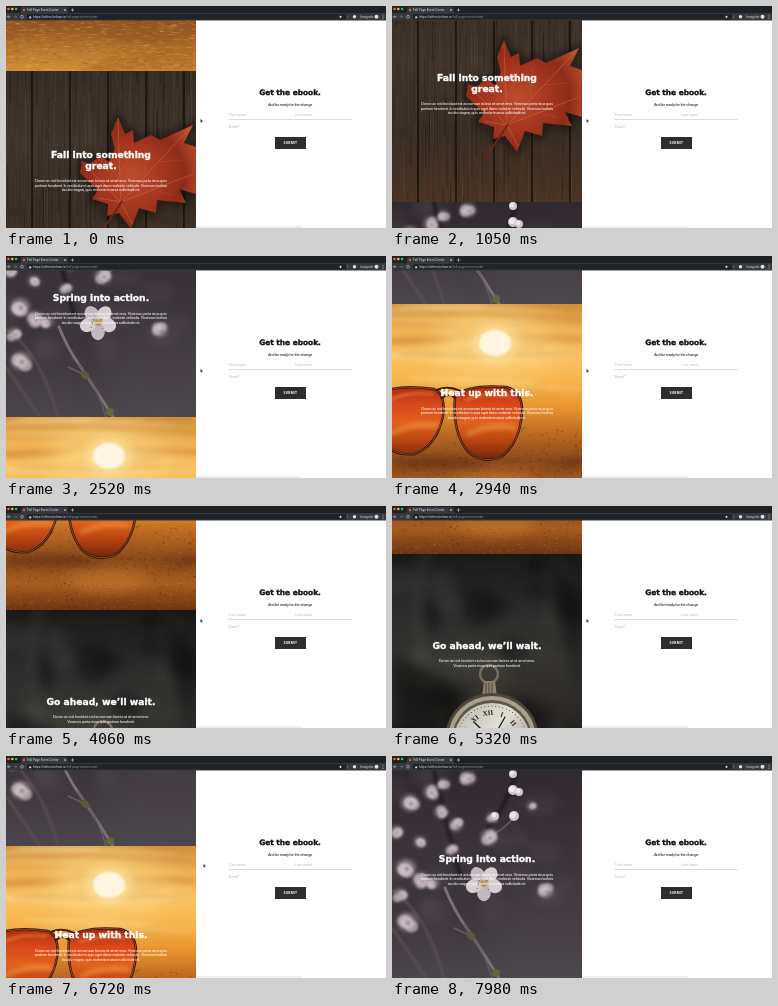
An HTML page with a canvas for the animation above (8120 ms loop, 380 by 222 pixels).

```html
<!DOCTYPE html>
<html lang="en">
<head>
<meta charset="utf-8">
<title>Seasons landing page</title>
<style>
html, body { margin: 0; width: 100%; height: 100%; overflow: hidden; background: #fff; }
#stage { position: relative; width: 380px; height: 222px; overflow: hidden; font: 4px/4.6px Roboto, sans-serif; }
#stage div, #stage span, canvas, h2, p, svg { position: absolute; margin: 0; white-space: pre; }
#view { left: 0; top: 14px; width: 190px; height: 208px; overflow: hidden; }
.panel { left: 0; width: 190px; height: 208px; color: #fff; text-align: center; }
.panel h2, .panel p { left: 0; width: 190px; }
h2 { font: 700 9.2px/10.6px "DejaVu Sans", sans-serif; -webkit-text-stroke: .35px; }
p { letter-spacing: -.21px; }
#form { left: 190px; top: 14px; width: 190px; height: 208px; background: #fff; color: #111; }
#form h2, #form p { left: 0; width: 188px; text-align: center; }
#form h2 { top: 68px; font-size: 7.4px; }
#form p { top: 82.8px; }
#form span { color: #b8b8b8; font-size: 3.6px; }
#form i { position: absolute; height: 1px; background: #ddd; }
#button { left: 79px; top: 117px; width: 31px; height: 12px; background: #2d2d2d; color: #fff;
  font: 700 3.3px/12px Roboto, sans-serif; letter-spacing: .3px; text-align: center; }
</style>
</head>
<body>
<div id="stage">
  <div id="view"><div id="page"></div></div>
  <div id="form">
    <h2>Get the ebook.</h2>
    <p>And be ready for the change</p>
    <span style="left:33px;top:93px">First name</span>
    <span style="left:99px;top:93px">Last name</span>
    <span style="left:33px;top:104.5px">Email*</span>
    <i style="left:32px;top:99px;width:124px"></i>
    <div id="button">SUBMIT</div>
    <i style="left:0;top:206px;width:106px;height:2px;background:#eee"></i>
  </div>
  <svg width="380" height="15" style="left:0;top:0" font-family="Roboto, sans-serif" font-size="3.2">
    <path fill="#1e2124" d="M0 0H380V14H0Z"/>
    <path fill="#35393d" d="M0 7H14Q15 7 15 5V3Q15 1 17 1H60Q62 1 62 3V5Q62 7 63 7H380V14.6H0Z"/>
    <circle cx="2.5" cy="3" r="1.3" fill="#f35f56"/>
    <circle cx="6.3" cy="3" r="1.3" fill="#f7bd2e"/>
    <circle cx="10.1" cy="3" r="1.3" fill="#2bc840"/>
    <circle cx="18" cy="4" r="1.2" fill="#e8622c"/>
    <path fill="#202327" d="M22 8H340V13.4H22Q19.5 10.7 22 8Z"/>
    <g fill="#dcdee0">
      <text x="21" y="5.2">Fall Page Event Center</text>
      <text x="27" y="12">https://offers.kelmor.io<tspan fill="#8c9094">/fall-page-event-center</tspan></text>
      <text x="354" y="12">Incognito</text>
      <circle cx="348.5" cy="10.7" r="1.7"/>
      <circle cx="370.5" cy="10.7" r="2"/>
      <path d="M333 10.3H336L333.6 12.2L334.5 9L335.4 12.2ZM376.6 8.8h.8v.8h-.8zM376.6 10.4h.8v.8h-.8zM376.6 12h.8v.8h-.8zM23.2 10.4h2v1.8h-2z"/>
    </g>
    <g fill="none" stroke="#c8cbce" stroke-width=".6">
      <path d="M58 3l2 2m0-2l-2 2M66.5 2.3v3.4M64.8 4h3.4M4.6 10.7H1.5l1.4-1.4M1.5 10.7l1.4 1.4"/>
      <path stroke="#777" d="M7.7 10.7h3.1l-1.4-1.4M10.8 10.7l-1.4 1.4M341.5 9.5v2.5"/>
      <circle cx="16" cy="10.7" r="1.4"/>
    </g>
  </svg>
  <svg id="cursor" width="4" height="5" style="left:0;top:0"><path d="M.4 .3V4L1.4 3.2L2 4.6L2.6 4.3L2 3H3.2Z" fill="#111" stroke="#fff" stroke-width=".3"/></svg>
</div>
<script>
const W = 190, H = 208, TAU = Math.PI * 2;
let seed = 7;
const rnd = (a = 0, b = 1) => {
  seed = (seed * 16807) % 2147483647;
  return a + (b - a) * seed / 2147483647;
};

let c;
function shade(gradient, stops) {
  stops.forEach((color, i) => gradient.addColorStop(i / (stops.length - 1), color));
  return gradient;
}
function backdrop(...stops) {
  c.fillStyle = shade(c.createLinearGradient(0, 0, 0, H), stops);
  c.fillRect(0, 0, W, H);
}
function oval(x, y, rx, ry, fill, blur = 0, turn = 0) {
  c.filter = blur ? `blur(${blur}px)` : 'none';
  c.fillStyle = fill;
  c.beginPath();
  c.ellipse(x, y, rx, ry, turn, 0, TAU);
  c.fill();
  c.filter = 'none';
}
function path(d, color, width, blur = 0) {
  c.filter = blur ? `blur(${blur}px)` : 'none';
  const p = new Path2D(d);
  c.lineCap = c.lineJoin = 'round';
  if (width) { c.strokeStyle = color; c.lineWidth = width; c.stroke(p); }
  else { c.fillStyle = color; c.fill(p); }
  c.filter = 'none';
}
function grain(n, y0, y1, w, h, colors) {
  for (let i = 0; i < n; i++) {
    c.fillStyle = colors[i % colors.length];
    c.fillRect(rnd(-w, W), rnd(y0, y1), w * rnd(.4, 1), h * rnd(.4, 1));
  }
}

function desert() {
  backdrop('#d9a860', '#c88a42', '#b8722d', '#925322', '#d18e36');
  path('M0 157H190V180Q140 186 90 174T0 178Z', '#8f542677', 0, 2);
  path('M190 174Q120 186 70 208H190Z', '#a8662599', 0, 3);
  grain(650, 155, H, 7, 1, ['#e9b35a55', '#7b431c44', '#f0c87a33']);
}

function leaf() {
  backdrop('#352c25', '#40352c', '#382d25', '#4a3424');
  grain(380, -40, H, 1, 70, ['#7465543a', '#15100c55', '#59483944']);
  for (let x = 26; x < W; x += 38) path(`M${x} 0V208`, '#120e0b', 1.4, .5);
  const edge = 'M112 46L119 63L127 59L128 72L145 64L154 69L187 54L178 72L190 76V123L173 118L180 132L151 129L150 142L133 137L125 158L113 142L101 145L102 133L86 128L92 119L74 102L76 90L84 93L94 85L103 91L109 78L105 63Z';
  path(edge, '#0a0604aa', 6, 4);
  path(edge, shade(c.createRadialGradient(126, 105, 5, 126, 105, 75), ['#b94a2c', '#a83720', '#8f2b19', '#c2512e']));
  path('M115 131L112 52M115 131L183 58M115 131L79 94M115 131L187 103M115 131L126 152M115 131L92 127', '#d4753f99', .8);
  path('M113 92L106 83M114 103L122 89M139 104L140 76M153 91L175 89M145 118L165 124', '#d4753f77', .5);
  path('M116 130Q107 145 92 165', '#6e2418', 1.8);
}

function flower(x, y, r) {
  for (let i = 0; i < 5; i++) {
    const a = i * TAU / 5 + .32;
    oval(x + Math.cos(a) * r * .58, y + Math.sin(a) * r * .55, r * .46, r * .38, i % 2 ? '#c4b8c0' : '#d8cdd3', .7, a);
  }
  oval(x, y, r * .25, r * .22, '#b59a62', .8);
  for (let i = 0; i < 9; i++) oval(x + rnd(-r, r) * .4, y + rnd(-r, r) * .4, .6, .6, '#7d6243');
}
function spring() {
  backdrop('#2f292f', '#3a3339', '#3d363d', '#4b464b');
  oval(160, 170, 60, 70, '#514c5255', 15);
  for (let i = 0; i < 16; i++) oval(rnd(0, W), rnd(0, 150), rnd(8, 20), rnd(6, 16), '#766a7022', 5);
  path('M42 0Q56 60 68 105M125 0Q118 30 96 58', '#231c1f', 4, 1.5);
  path('M0 120Q34 142 52 208M0 158L34 208', '#5b4e50', 2.5, 1);
  path('M53 118Q62 140 72 154T107 208', '#7a7078', 3, .5);
  path('M72 154Q92 178 100 208M79 166L62 158M97 66Q112 60 122 47', '#665b62', 1.5, .5);
  [[76, 8, 9], [49, 42, 8], [39, 22, 9], [18, 33, 11], [100, 48, 6], [97, 67, 10], [64, 55, 8],
   [14, 98, 12], [29, 110, 10], [41, 113, 7], [15, 152, 12], [154, 121, 9], [4, 62, 8], [52, 14, 7],
   [60, 80, 7], [28, 72, 7], [8, 125, 8], [140, 36, 5]]
    .forEach(([x, y, r]) => {
      oval(x, y, r * .8, r * .75, '#b3a3abaa', 2);
      for (let i = 0; i < 3; i++) oval(x + rnd(-.4, .4) * r, y + rnd(-.4, .4) * r, r * .55, r * .5, '#d0c4c999', 1.3);
      oval(x + 1, y + 1, r * .2, r * .18, '#76616788', 1);
    });
  [[122, 46, 5], [121, 20, 5], [127, 22, 4], [121, 4, 4], [103, 46, 4]].forEach(([x, y, r]) => {
    oval(x, y, r, r, '#cfc5c9', .7);
    oval(x - 1, y - 1, r * .6, r * .6, '#eee8ea', .7);
  });
  flower(92, 113, 18);
  oval(79, 166, 5, 3.5, '#5b5a3d', .6, .8);
  oval(104, 203, 4, 4, '#66633f', .6);
}

function glasses() {
  backdrop('#cf9140', '#f0b252', '#f9c261', '#f6b44a', '#e8942f', '#bb6a22', '#8a4a1c', '#a65c1f', '#6d3412');
  for (let i = 0; i < 22; i++) oval(rnd(0, W), rnd(0, 90), rnd(40, 90), rnd(1.5, 4), i % 2 ? '#c9803055' : '#ffe09a55', 2, rnd(-.06, .06));
  oval(103, 40, 60, 32, '#ffdf8f88', 14);
  oval(103, 39, 24, 19, '#ffe9ab99', 5);
  oval(103, 39, 16, 13, '#fff5e0', 1.2);
  grain(900, 122, H, 2.5, 1.4, ['#e0944433', '#2f160a44', '#b8692a55']);
  path('M0 158Q50 148 95 160T190 152V164H0Z', '#4a1f0b77', 0, 4);
  oval(102, 178, 40, 12, '#d3873a66', 6);
  const lens = shade(c.createLinearGradient(0, 82, 0, 156), ['#a8290d', '#d8481a', '#e2611c', '#b8430f', '#6e250b']);
  const rims = ['M-8 88Q8 80 42 85Q54 90 51 112Q45 141 23 150Q3 152 -8 140Z',
                'M63 92Q76 80 114 83Q131 87 130 108Q128 139 109 153Q92 160 77 149Q60 130 63 92Z'];
  rims.forEach(d => {
    path(d, lens);
    path(d, '#35110a', 2.4);
    path(d, '#d68a42', .5);
  });
  path('M50 94Q57 88 63 94M45 86Q56 81 68 87', '#431409', 2);
  path('M74 96Q92 88 118 92M0 95Q18 87 40 90', '#f6a04b77', 3, 1.5);
  path('M76 130Q97 120 122 124M0 129Q22 119 45 122', '#fabd5966', 5, 2);
}

function watch() {
  backdrop('#19191a', '#2b2b2b', '#373632', '#2c2a26', '#171614');
  for (let i = 0; i < 28; i++) oval(rnd(0, W), rnd(10, H), rnd(8, 28), rnd(6, 22), i % 2 ? '#0b0b0c66' : '#65625a2c', 6);
  path('M0 95L60 130L42 208H0ZM150 0L190 40V150Z', '#0d0d0e99', 0, 8);
  path('M34 0Q20 50 32 108', '#5a595544', 10, 6);
  path('M88 120a9 9 0 1 1 18 0a9 9 0 1 1 -18 0', '#78705f', 2.4);
  path('M92 127H103L105 143H90Z', '#8b816c');
  path('M94 129V141M97 129V141M100 129V141', '#3f392e', .8);
  oval(100, 185, 47, 46, '#4d463b');
  oval(100, 185, 44, 43, '#aaa18d');
  oval(100, 185, 40, 39, '#5d564b');
  oval(100, 186, 38, 37, shade(c.createLinearGradient(65, 150, 135, 208), ['#b9b6ad', '#e2dfd5', '#9b978b']));
  c.fillStyle = '#25231f';
  c.font = '700 7px "Liberation Serif", serif';
  c.textAlign = 'center';
  ['XII', 'I', 'II', 'III', 'IV', 'V', 'VI', 'VII', 'VIII', 'IX', 'X', 'XI'].forEach((s, i) => {
    c.save();
    c.translate(100, 186);
    c.rotate(i * TAU / 12 - .15);
    c.fillText(s, 0, -25);
    c.restore();
  });
  for (let i = 0; i < 60; i++) {
    const a = i * TAU / 60;
    oval(100 + Math.cos(a) * 35, 186 + Math.sin(a) * 34, .5, .5, '#333');
  }
  path('M100 186L82 168M100 186L113 163', '#1b1a18', 1.3);
  oval(100, 186, 2, 2, '#1b1a18');
}

const lorem = `Donec ac nisl tincidunt est accumsan lacinia sit amet eros. Vivamus porta risus quis
pretium hendrerit. In vestibulum turpis eget diam molestie vehicula. Vivamus facilisis
iaculis magna, quis molestie massa sollicitudin et.`;
const shortLorem = `Donec ac nisl tincidunt nisl accumsan lacinia at sit amet eros.
Vivamus porta risus quis pretium hendrerit.`;
// painter, heading, heading top, paragraph, paragraph top
const panels = [
  [desert, '', 0, '', 0],
  [leaf, 'Fall into something\ngreat.', 79, lorem, 108],
  [spring, 'Spring into action.', 84, lorem, 102.5],
  [glasses, 'Heat up with this.', 84, lorem, 102.5],
  [watch, 'Go ahead, we’ll wait.', 86.5, shortLorem, 105]
];
const page = document.getElementById('page');
function add(parent, tag, props, top) {
  const el = Object.assign(document.createElement(tag), props);
  el.style.top = top + 'px';
  return parent.appendChild(el);
}
panels.forEach(([paint, title, titleTop, text, textTop], i) => {
  const panel = add(page, 'div', { className: 'panel' }, i * H);
  c = add(panel, 'canvas', { width: W, height: H, style: 'left:0' }, 0).getContext('2d');
  paint();
  add(panel, 'h2', { textContent: title }, titleTop);
  add(panel, 'p', { textContent: text }, textTop);
});

// first moving tick, time already elapsed by then, from panel, to panel
const moves = [
  [0, 485, 0, 1], [1050, 61, 1, 2], [2450, 82, 2, 3],
  [3780, 48, 3, 4], [5320, 82, 4, 3], [6580, 55, 3, 2]
];
const LOOP = 8120, TICK = 70, GLIDE = 960;
const clamp = x => Math.min(1, Math.max(0, x));
const cursor = document.getElementById('cursor');

function draw(now) {
  const t = Math.floor(now % LOOP / TICK) * TICK;
  const [start, lead, from, to] = moves.findLast(m => m[0] <= t);
  const rest = 1 - clamp((t - start + lead) / GLIDE);
  const scroll = Math.round(H * (from + (to - from) * (1 - rest * rest)));
  page.style.transform = `translateY(${-scroll}px)`;

  const a = clamp((t - 6370) / 350), b = clamp((t - 6720) / 420);
  cursor.style.transform = `translate(${194 + 3 * a + 15 * b}px, ${112.5 - 5 * a - 97 * b}px)`;
  cursor.style.visibility = b < 1 ? 'visible' : 'hidden';
}
const origin = performance.now();
function frame() {
  draw(performance.now() - origin);
  requestAnimationFrame(frame);
}
draw(0);
requestAnimationFrame(frame);
</script>
</body>
</html>
```
